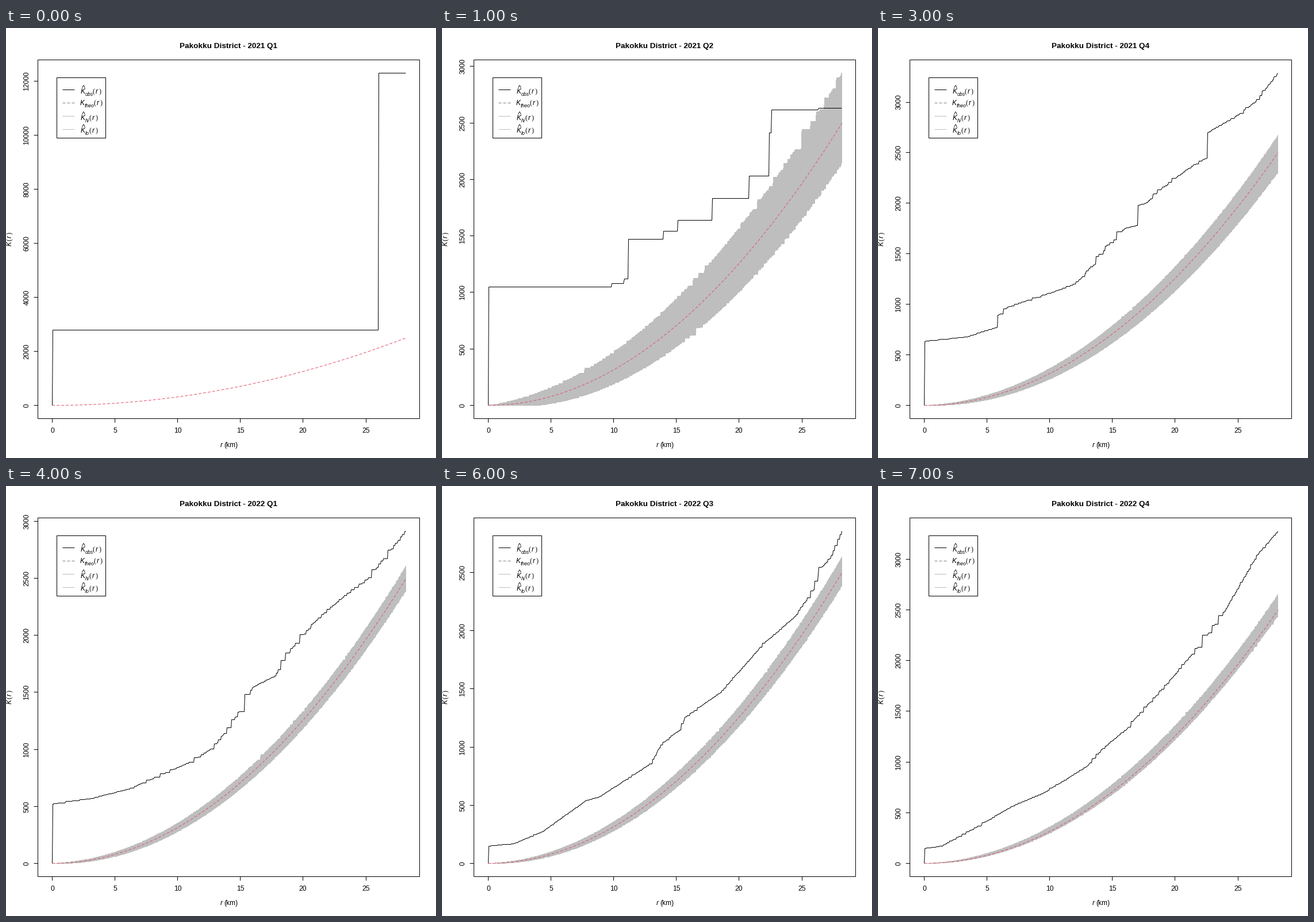
A matplotlib script that plays this animation: 748 px wide and 748 px high, repeating every 8000 ms.

```python
import numpy as np
import matplotlib.pyplot as plt
from matplotlib.animation import FuncAnimation

SIZE, DPI = 748, 64
PX = 72 / DPI                      # one stage pixel in points
LEFT, RIGHT, TOP, BOTTOM = 55, 719, 55, 679
X0, X1, Y0, SPAN = 79.6, 695.4, 656, 578
R_MAX = 28.2

r = np.linspace(0, R_MAX, 513)
x_px = X0 + (X1 - X0) * r / R_MAX
theo = np.pi * r ** 2
rng = np.random.default_rng(7)


def to_y(k, top):
    return Y0 - k * SPAN / top


def from_zero(k):
    return np.concatenate([[0], k[1:]])


def levels(points):
    """Each level holds until the next distance."""
    rs, ks = np.array(points).T
    return from_zero(ks[np.searchsorted(rs, r, "right") - 1])


def hold(k, keep):
    """Turn a smooth curve into small random steps around it."""
    kept = rng.random(r.size) < keep
    kept[[0, -1]] = True
    idx = np.flatnonzero(kept)
    middles = (idx[1:] + idx[:-1]) / 2
    return k[idx[np.searchsorted(middles, np.arange(r.size))]]


def path(points, keep):
    return from_zero(hold(np.interp(r, *np.array(points).T), keep))


def band(above, below, power, keep):
    """Envelope that widens around the theoretical curve."""
    u = (r / R_MAX) ** power
    return (hold(theo + above * u, keep),
            hold(np.maximum(theo - below * u, 0), keep))


def blend(a, b):
    return tuple((p + q) / 2 for p, q in zip(a, b))


# Key points are (distance, K).
q1 = (levels([(0, 2790), (26.05, 12296)]), theo, theo)
q2 = (levels([(0, 1047), (9.85, 1078), (10.8, 1118), (11.15, 1470),
              (13.95, 1540), (15.1, 1637), (17.9, 1832), (20.8, 2028),
              (22.4, 2410), (22.55, 2613), (26.3, 2628)]),
      *band(442, 351, 1, 0.35))
q3 = (path([(0, 747), (3.5, 780), (5.75, 900), (5.85, 1110), (6.6, 1265),
            (12.1, 1450), (14.2, 1830), (15.3, 1945), (17.35, 1965),
            (17.45, 2350), (22.35, 2620), (22.6, 3110), (26.4, 3340),
            (28.2, 3657)], 0.2),
      *band(234, 278, 1.3, 0.65))
q5 = (path([(0, 520), (3.2, 570), (6.2, 655), (11.3, 903), (12.9, 1020),
            (13.8, 1150), (15.1, 1360), (16, 1545), (17.8, 1645),
            (18.4, 1795), (20.9, 2115), (22.9, 2310), (25.1, 2490),
            (28.2, 2913)], 0.35),
      *band(108, 100, 1, 0.7))
q7 = (path([(0, 148), (2, 168), (4.3, 270), (7.8, 539), (8.9, 573),
            (13, 860), (13.8, 1022), (15.4, 1160), (15.7, 1255),
            (18.5, 1467), (22, 1893), (24.4, 2115), (26, 2360),
            (26.1, 2490), (27.3, 2628), (28.2, 2855)], 0.5),
      *band(133, 109, 1.1, 0.7))
q8 = (path([(0, 147), (1.4, 170), (4.5, 380), (6.9, 556), (9.5, 692),
            (13, 958), (14, 1106), (16.2, 1330), (16.9, 1440),
            (19.2, 1747), (21.9, 2144), (23.9, 2478), (25.4, 2796),
            (26.5, 3034), (28.2, 3277)], 0.5),
      *band(153, 51, 1.2, 0.7))
quarters = [q1, q2, q3, blend(q3, q5), q5, blend(q5, q7), q7, q8]

fig = plt.figure(figsize=(SIZE / DPI, SIZE / DPI), dpi=DPI, facecolor="white")
ax = fig.add_axes([0, 0, 1, 1])
ax.set_xlim(-0.5, SIZE - 0.5)
ax.set_ylim(SIZE - 0.5, -0.5)
ax.axis("off")


def line(xs, ys, color="black", **kw):
    return ax.plot(xs, ys, color=color, lw=PX, solid_capstyle="butt",
                   dash_capstyle="butt", solid_joinstyle="miter", **kw)[0]


def box(x0, y0, x1, y1):
    line([x0, x1, x1, x0, x0], [y0, y0, y1, y1, y0], zorder=4)


def text(x, y, s, px=12, font="Liberation Sans", **kw):
    return ax.text(x, y, s, fontsize=px * PX, fontfamily=font, va="baseline",
                   rotation_mode="anchor", **kw)


def italic(x, y, s, px=12, **kw):
    text(x, y, s, px, style="italic", **kw)


def serif(x, y, s, **kw):
    text(x, y, s, font="Liberation Serif", **kw)


def legend_label(x, y, sub, arg_x, hat=True):
    italic(x, y, "K")
    if hat:
        text(x + 1.5, y - 6.5, "^", 12.5)
    italic(x + 8, y + 3, sub, 8.8)
    serif(arg_x, y, "(")
    italic(arg_x + 5, y, "r")
    serif(arg_x + 10.5, y, ")")


DASH = (0, (5, 3))
RED, GREY, DARK = "#DF536B", "#BEBEBE", "#7F7F7F"

envelope = ax.fill([0], [0], color=GREY, lw=0, antialiased=False, zorder=1)[0]
obs_line = line([], [], zorder=2)
theo_line = line([], [], RED, linestyle=DASH, zorder=3)

box(LEFT, TOP, RIGHT, BOTTOM)
for v in range(0, 30, 5):
    x = round(X0 + (X1 - X0) * v / R_MAX)
    line([x, x], [BOTTOM, BOTTOM + 7])
    text(x, 704, str(v), ha="center")
italic(372, 729, "r")
text(378.5, 729, "(km)")
italic(9, 379, "K", rotation=90)
serif(9, 369.5, "(", rotation=90)
italic(9, 364.5, "r", rotation=90)
serif(9, 359, ")", rotation=90)

box(88, 86, 173, 191)
for y, color, style in [(107, "black", "-"), (130, DARK, DASH),
                        (153, GREY, "-"), (176, GREY, "-")]:
    line([97.5, 118.5], [y, y], color, linestyle=style)
legend_label(129.5, 114, "obs", 150.5)
legend_label(128, 134, "theo", 152.5, hat=False)
legend_label(129.5, 160, "hi", 144.5)
legend_label(129.5, 182, "lo", 144.5)

title = text(387, 34, "", 13.45, weight="bold", ha="center")
y_axis = []


def draw_y_axis(top):
    while y_axis:
        y_axis.pop().remove()
    step = 2000 if top > 10000 else 1000 if top > 3500 else 500
    for v in range(0, int(top * 1.04) + 1, step):
        y = round(to_y(v, top))
        y_axis.append(line([LEFT - 7, LEFT], [y, y]))
        y_axis.append(text(39, y, str(v), rotation=90, ha="center"))


def update(i):
    obs, hi, lo = quarters[i]
    top = max(obs.max(), hi.max())
    title.set_text(f"Pakokku District - {2021 + i // 4} Q{i % 4 + 1}")
    draw_y_axis(top)
    edge = np.concatenate([to_y(hi, top), to_y(lo, top)[::-1]])
    envelope.set_xy(np.column_stack([np.concatenate([x_px, x_px[::-1]]), edge]))
    envelope.set_visible(i > 0)
    # Whole pixels keep the thin line crisp.
    obs_line.set_data(np.round(x_px), np.round(to_y(obs, top)))
    theo_line.set_data(x_px, to_y(theo, top))
    return []


anim = FuncAnimation(fig, update, frames=8, interval=1000, repeat=True,
                     repeat_delay=0, init_func=lambda: update(0))
plt.show()
```
